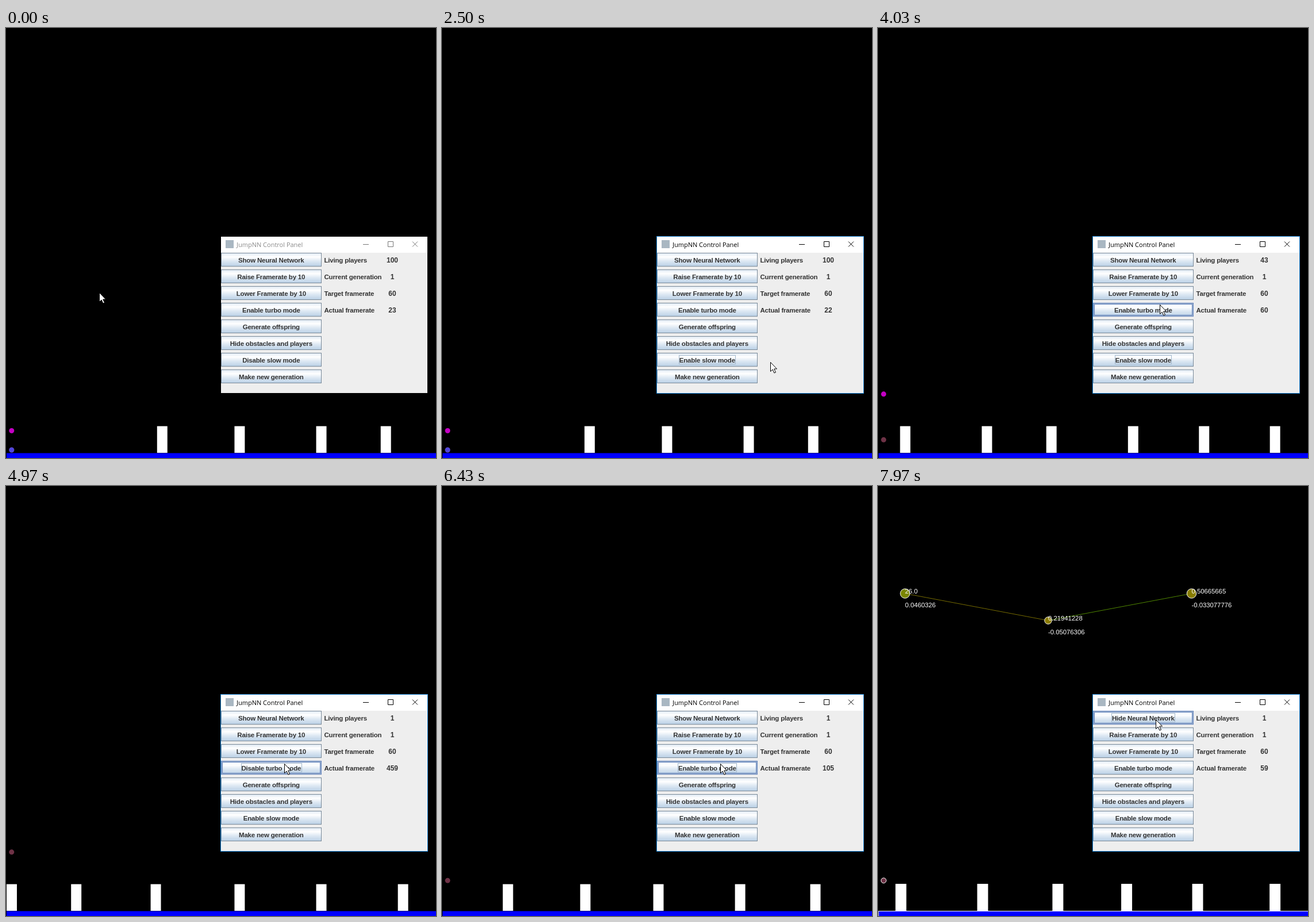
Recreate the animation shown at these times as an HTML page. Size 748 by 748 pixels, loop 8 s.

```html
<!DOCTYPE html>
<html lang="en">
<head>
<meta charset="utf-8">
<title>JumpNN</title>
<style>
html, body { margin: 0; width: 100%; height: 100%; overflow: hidden; background: #000; }
svg { display: block; width: 748px; height: 748px; }
text { white-space: pre; }
.ui { font: bold 11.5px "Liberation Sans", Arial, sans-serif; letter-spacing: -.2px; fill: #333; }
.num { font-size: 12px; letter-spacing: 0; }
.mid { text-anchor: middle; }
.title { font: 11px "Open Sans", "Noto Sans", sans-serif; }
.net { font: 11.3px "Liberation Sans", Arial, sans-serif; fill: #fff; }
</style>
</head>
<body>
<svg viewBox="0 0 748 748">
  <defs>
    <linearGradient id="metal" x2="0" y2="1">
      <stop stop-color="#dde8f3"/><stop offset=".3" stop-color="#fff"/>
      <stop offset=".6" stop-color="#dde8f3"/><stop offset="1" stop-color="#b8cfe5"/>
    </linearGradient>
  </defs>
  <g id="scene"></g>
</svg>
<script>
const scene = document.getElementById('scene');
const LOOP = 8000;
const STEP = 3.74;    // pixels a wall moves per game tick
const FLIGHT = 21;    // ticks from take-off to landing
const TAKE_OFF = 11;  // ticks before a wall at which the skilled player jumps

// Times of events
const SLOW_DOWN = 1830, SLOW_UP = 2130, FULL_SPEED = 2499;
const FIRST_CRASH = 3540, SECOND_CRASH = 4170;
const TURBO_DOWN = 4190, TURBO_ON = 4300, OFF_DOWN = 5970, TURBO_OFF = 6070;
const NET_DOWN = 7150, NET_ON = 7260;

// Pointer moves: start, end, x, y
const moves = [[200, 230, 179, 463], [400, 1200, 470, 566], [1300, 1800, 512, 574],
  [2130, 2270, 571, 581], [2600, 4030, 490, 481], [4030, 4170, 484, 483], [6670, 7060, 483, 406]];

// Walls stand 30 to 39 ticks apart; even spacing joins the three stretches
const walls = [];
for (const [start, ...extra] of [[70, 6, 8, 0, 8, 3, 3], [419, 0, 7, 9, 8, 8],
  [836, 2, 6, 7, 5, 6, 4, 8, 5, 2, 3, 6]]) {
  const from = walls.at(-1), room = start - from, count = Math.round(room / 35);
  for (let i = 1; i < count; i++) walls.push(from + room * i / count);
  walls.push(start);
  for (const e of extra) walls.push(walls.at(-1) + 30 + e);
}

const clamp = (v, lo, hi) => Math.min(hi, Math.max(lo, v));
const smooth = p => p * p * (3 - 2 * p);
const sigmoid = v => 1 / (1 + Math.exp(-v));

function pointer(t) {
  let x = 162, y = 460;
  for (const [start, end, toX, toY] of moves) {
    const p = smooth(clamp((t - start) / (end - start), 0, 1));
    x += (toX - x) * p;
    y += (toY - y) * p;
  }
  return [Math.round(x), Math.round(y)];
}

// Slow mode runs at 1 tick per second, then 60, and 460 in turbo mode
function ticks(t) {
  if (t < FULL_SPEED) return (t >= 500) + (t >= 1500);
  const turbo = clamp(t, TURBO_ON, TURBO_OFF) - TURBO_ON;
  const hitch = t >= NET_ON ? 2 : 0;
  return 4 + Math.round(.06 * (t - FULL_SPEED) + .4 * turbo) - hitch;
}

function framerate(t) {
  const settle = (from, to, start, tau) => to + (from - to) * Math.exp((start - t) / tau);
  if (t < FULL_SPEED) return t < 500 ? 23 : 22;
  if (t < TURBO_ON) return settle(22, 60, FULL_SPEED, 300);
  if (t < TURBO_OFF) return settle(60, 464, TURBO_ON, 155);
  return settle(464, 59, TURBO_OFF, 167);
}

const jump = n => n > 0 && n < FLIGHT ? .883 * n * (FLIGHT - n) : 0;
const skilled = d => jump(TAKE_OFF + d - walls.find(w => w - d > TAKE_OFF - FLIGHT));
const hopper = d => jump((d + FLIGHT - 2) % FLIGHT);

const rect = (x, y, w, h, fill, more = '') =>
  `<rect x="${x}" y="${y}" width="${w}" height="${h}" fill="${fill}" ${more}/>`;
const frame = (x, y, w, h, color) => rect(x + .5, y + .5, w - 1, h - 1, 'none', `stroke="${color}"`);
const text = (x, y, cls, s, more = '') => `<text x="${x}" y="${y}" class="${cls}" ${more}>${s}</text>`;

function game(t, d) {
  const outline = t >= NET_ON ? 'stroke="#fff"' : '';
  const ball = (h, color) => `<circle cx="9.8" cy="${734 - h}" r="4.5" fill="${color}" ${outline}/>`;
  let s = rect(1, 739.5, 748, 9, '#00f', outline);
  for (const w of walls) {
    const x = 1 + STEP * (w - d);
    if (w >= d && x < 748) s += rect(x, 692.6, 17.95, 46.4, '#fff', outline);
  }
  s += ball(skilled(d), '#6e3246');
  if (t < FIRST_CRASH) s += ball(0, '#5046dc');
  if (t < SECOND_CRASH) s += ball(hopper(d), '#c400c4');
  return s;
}

function network(d) {
  const input = Math.round(walls.map(w => 5 * (w - d) - 14).find(v => v >= 0));
  const hidden = sigmoid(-.046858905 * input - .05076306);
  const output = sigmoid(.2721177 * hidden - .033077776);
  const node = (x, y, r, color, value, bias) =>
    `<circle cx="${x}" cy="${y}" r="${r}" fill="${color}" stroke="#fff"/>` +
    text(x, y, 'net', value) + text(x, y + 23.5, 'net', bias);
  return `<path d="M47 187L296 234" stroke="#756a00"/><path d="M296 234L545.5 187" stroke="#4f8500"/>` +
    node(47, 187, 8.2, '#7a8500', input.toFixed(1), '0.0460326') +
    node(296, 234, 6.2, '#8a7b00', hidden.toPrecision(8), '-0.05076306') +
    node(545.5, 187, 8.2, '#887d00', output.toPrecision(8), '-0.033077776');
}

function panel(t, px, py) {
  const active = t >= SLOW_DOWN;
  const within = (a, b) => t >= a && t < b;
  const focus = t >= NET_DOWN ? 0 : t >= TURBO_DOWN ? 3 : active ? 6 : -1;
  const pressed = within(SLOW_DOWN, SLOW_UP) || within(TURBO_DOWN, TURBO_ON) ||
    within(OFF_DOWN, TURBO_OFF) || within(NET_DOWN, NET_ON);
  const living = t < FIRST_CRASH ? 100 : t < SECOND_CRASH ? 43 : 1;
  const labels = [
    `${t < NET_ON ? 'Show' : 'Hide'} Neural Network`, 'Raise Framerate by 10', 'Lower Framerate by 10',
    `${within(TURBO_ON, TURBO_OFF) ? 'Disable' : 'Enable'} turbo mode`, 'Generate offspring',
    'Hide obstacles and players', `${t < SLOW_UP ? 'Disable' : 'Enable'} slow mode`, 'Make new generation'];
  const stats = [['Living players', living], ['Current generation', 1],
    ['Target framerate', 60], ['Actual framerate', Math.round(framerate(t))]];

  let s = rect(374, 363, 359, 272, '#eee') + rect(374, 363, 359, 28, '#fff') +
    (active ? frame(373, 362, 361, 274, '#1883d7') : '') +
    rect(382, 369, 14, 14, '#a9b7c2') +
    text(401, 381, 'title', 'JumpNN Control Panel', `fill="${active ? '#000' : '#8a8a8a'}"`) +
    `<path d="M621 376.5H631M664.5 371.5H673.5V380.5H664.5ZM707 371.5L716 380.5M716 371.5L707 380.5"
      fill="none" stroke="${active ? '#000' : '#777'}"/>`;
  labels.forEach((label, i) => {
    const y = 391 + 29 * i;
    const hover = px >= 374 && px < 549 && py >= y && py < y + 24;
    const borders = hover ? ['#6382bf', '#a3b8cc', '#6382bf'] : ['#7a8a99'];
    s += rect(374, y, 175, 24, pressed && focus === i ? '#b8cfe5' : 'url(#metal)');
    borders.forEach((color, k) => s += frame(374 + k, y + k, 175 - 2 * k, 24 - 2 * k, color));
    s += text(461.3, y + 17, 'ui mid', label, i === focus ? 'id="focus"' : '');
  });
  stats.forEach(([name, value], i) => {
    const y = 408 + 29 * i;
    s += text(553.5, y, 'ui', name) + text(672, y, 'ui num mid', value);
  });
  return s;
}

const arrow = (x, y) => `<path transform="translate(${x + .5} ${y + .5})"
  d="M0 0V16L3.6 12.5L6.4 18.6L9 17.5L6.2 11.5H11Z" fill="#fff" stroke="#000"/>`;

function focusBox() {
  const label = document.getElementById('focus');
  if (!label) return;
  const w = Math.round(label.getBBox().width) + 2;
  const y = label.getAttribute('y') - 13;
  label.insertAdjacentHTML('beforebegin', frame(Math.round(461.5 - w / 2), y, w, 16, '#a3b8cc'));
}

let last = -1;
function draw() {
  // The picture advances 30 times a second
  const step = Math.floor((performance.now() % LOOP + 3.4) * .03) % 240;
  if (step !== last) {
    last = step;
    const t = step / .03, d = ticks(t), [px, py] = pointer(t);
    scene.innerHTML = game(t, d) + (t >= NET_ON ? network(d) : '') + panel(t, px, py) + arrow(px, py);
    focusBox();
  }
  requestAnimationFrame(draw);
}
draw();
</script>
</body>
</html>
```
